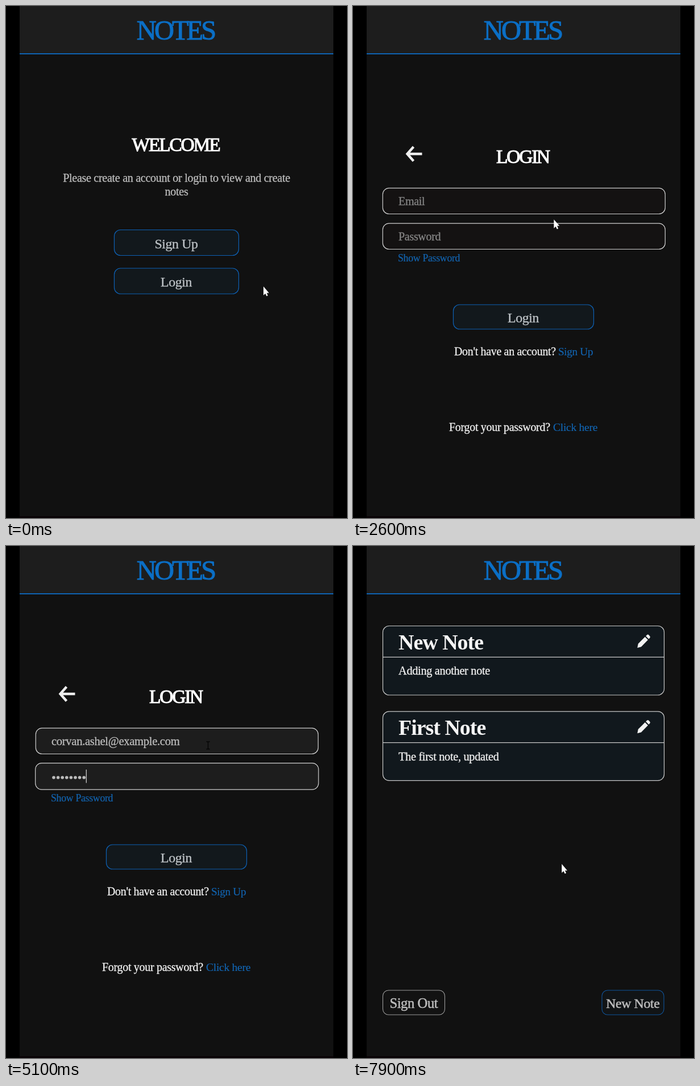
Write an HTML page that moves like this. It is 600 px wide and 900 px high and loops after 8000 ms.

```html
<!DOCTYPE html>
<html lang="en">
<head>
<meta charset="utf-8">
<title>Notes</title>
<style>
html, body { margin: 0; width: 100%; height: 100%; overflow: hidden; background: #000; }
svg { display: block; width: 600px; height: 900px; }
text { font-family: "Liberation Serif", "Times New Roman", serif; font-size: 20.2px; letter-spacing: -.017em; fill: #bdbdbd; stroke-width: .3px; stroke: currentColor; color: #bdbdbd; white-space: pre; }
.mid { text-anchor: middle; }
.brand { font-size: 48.5px; letter-spacing: -4px; fill: #0b6fc6; color: #0b6fc6; stroke-width: 1px; }
.head { font-size: 33.5px; letter-spacing: -2.2px; fill: #fff; color: #fff; stroke-width: 1.1px; }
.bright { fill: #f2f2f2; color: #f2f2f2; }
.link { fill: #1264b0; color: #1264b0; stroke-width: .2px; }
.title { font-size: 38px; letter-spacing: -.027em; font-weight: bold; fill: #f4f4f4; stroke: none; }
.hint { font-size: 20.1px; fill: #858585; color: #858585; }
.btn rect { fill: #12181c; stroke: #0d60b4; stroke-width: 1.2px; }
.btn text { font-size: 23.9px; fill: #bfc4c8; color: #bfc4c8; }
.btn.hover rect { fill: #0c1a28; }
.btn.hover text { fill: #fff; color: #fff; }
.foot text { font-size: 23.9px; stroke-width: .5px; }
.foot rect { stroke-width: 1.1px; }
.field { fill: #141212; stroke: #cfcfcf; stroke-width: 1.2px; }
.field.lit { fill: #1d1d1d; }
.card rect, .card path { fill: #11181d; stroke: #c8c8c8; stroke-width: 1.2px; }
.dot { fill: #136ec1; }
.caret { stroke: #d8d8d8; stroke-width: 1.2px; }
</style>
</head>
<body>
<svg viewBox="0 0 600 900">
  <defs>
    <g id="pencil">
      <path d="M500.3 179L501.8 171.8L513.8 159.8L519 165L507 177.3Z"/>
      <path d="M515.2 158.3L517.4 156.2Q518.8 155 520.2 156.3L522.3 158.4Q523.6 159.9 522.3 161.4L520.3 163.5Z"/>
    </g>
  </defs>
  <rect width="600" height="900"/>
  <rect x="24" width="552" height="897" fill="#111"/>
  <rect x="24" y="897" width="552" height="3" fill="#080205"/>
  <rect x="24" width="552" height="83" fill="#1d1d1d"/>
  <rect x="24" y="83" width="552" height="2" fill="#0e62b2"/>
  <text class="brand mid" x="298" y="58.8">NOTES</text>

  <g id="welcome">
    <text class="head mid" x="298.5" y="255">WELCOME</text>
    <text class="mid" x="300" y="309">Please create an account or login to view and create</text>
    <text class="mid" x="300" y="333">notes</text>
    <g class="btn">
      <rect x="190.5" y="393.5" width="219" height="45" rx="11"/>
      <text class="mid" x="299.5" y="425.5">Sign Up</text>
    </g>
    <g class="btn" id="enter">
      <rect x="190.5" y="461" width="219" height="45" rx="11"/>
      <text class="mid" x="299.5" y="493">Login</text>
    </g>
  </g>

  <g id="login">
    <path d="M106.5 247.5L95.5 260L106.5 272.5M97 260H121.5" fill="none" stroke="#eee" stroke-width="4.4"/>
    <text class="head mid" x="298.5" y="275.5">LOGIN</text>
    <rect class="field" id="mailBox" rx="11"/>
    <rect class="field" id="passBox" rx="11"/>
    <text class="hint" id="mailHint" x="80" y="349.5">Email</text>
    <text id="mail" x="80" y="349.5" style="font-size:20.7px"></text>
    <text class="hint" id="passHint" x="80" y="411.5">Password</text>
    <g id="bullets" fill="#bcbcbc"></g>
    <path class="caret" id="caret"/>
    <text class="link" x="79" y="449" style="font-size:17.8px">Show Password</text>
    <g class="btn" id="submit">
      <rect x="176.5" y="525" width="247" height="43" rx="11"/>
      <text class="mid" x="299.5" y="555.5">Login</text>
    </g>
    <text class="bright" x="178" y="614" style="font-size:20px">Don't have an account?</text>
    <text class="link" x="361" y="614" style="font-size:19.2px">Sign Up</text>
    <text class="bright" x="169" y="747" style="font-size:20.1px">Forgot your password?</text>
    <text class="link" x="352" y="747" style="font-size:19.7px">Click here</text>
  </g>

  <g id="loading">
    <text class="bright mid" x="300" y="285.5" style="font-size:19.6px">Data is loading...</text>
    <circle class="dot" cx="274" cy="331"/>
    <circle class="dot" cx="300" cy="331"/>
    <circle class="dot" cx="326" cy="331"/>
  </g>

  <g id="notes">
    <g class="card">
      <rect x="52.5" y="140.5" width="495" height="121.5" rx="11"/>
      <path d="M52.5 195.3H547.5"/>
      <text class="title" x="80" y="182">New Note</text>
      <text class="bright" x="80" y="226.3" style="font-size:20.4px">Adding another note</text>
    </g>
    <g class="card" transform="translate(0 150.3)">
      <rect x="52.5" y="140.5" width="495" height="121.5" rx="11"/>
      <path d="M52.5 195.3H547.5"/>
      <text class="title" x="80" y="182">First Note</text>
      <text class="bright" x="80" y="226.3" style="font-size:20.4px">The first note, updated</text>
    </g>
    <use href="#pencil" fill="#f2f2f2"/>
    <use href="#pencil" y="150.3" fill="#f2f2f2"/>
    <g class="foot">
      <rect x="52.5" y="781" width="109" height="43" rx="10" fill="#121212" stroke="#9c9c9c"/>
      <text class="mid" x="106.8" y="811.5" style="font-size:24.6px">Sign Out</text>
      <rect x="438" y="781" width="109" height="43" rx="10" fill="#111416" stroke="#0f549c"/>
      <text class="mid" x="492.3" y="811.5">New Note</text>
    </g>
  </g>

  <g id="cursor">
    <path id="arrow" fill="#fff" d="M0 -1V14.5L3.3 11.4L5.4 16L7.8 15L5.7 10.4H9.8Z"/>
    <path id="hand" fill="#fff" d="M-2 1.5Q-2 0 -.4 0T1.3 1.5V6.2Q3.6 5.6 4 7Q6.2 6.4 6.7 8Q9 7.6 9 9.8V13.5Q9 16 7.6 17.5V19.5H-.2V17.8Q-2.2 15.6 -3.8 12.8Q-5 10.6 -3.6 10.1Q-2.8 10 -2 11.2Z"/>
    <path id="beam" fill="none" stroke="#050505" stroke-width="1.4" d="M-3 -6.5H-1L0 -5.5L1 -6.5H3M0 -5.5V5.5M-3 6.5H-1L0 5.5L1 6.5H3"/>
  </g>
</svg>
<script>
const LOOP = 8000;
const MAIL = "corvan.ashel@example.com";
const OPEN_LOGIN = 2300, OPEN_LOADING = 6233, OPEN_NOTES = 7000;
const MAIL_FOCUS = 2850, PASS_FOCUS = 3600, PASS_TYPE = 4000, KEY_GAP = 100, PASS_LEN = 8;
const mailKeys = [[3000, 1], [3150, 2], [3300, MAIL.length]];

// time, x, y of the pointer's hot spot
const path = [
  [0, 453, 494], [900, 336, 662], [1000, 336, 662], [1400, 484, 585],
  [1800, 390, 492], [2050, 345, 482.5], [2350, 345, 482.5],
  [2700, 355.5, 350.5], [5300, 355.5, 350.5], [5900, 367.3, 560], [LOOP, 367.3, 560]
];

const $ = id => document.getElementById(id);
const show = (id, on) => $(id).style.display = on ? "" : "none";
const set = (el, attrs) => { for (const k in attrs) el.setAttribute(k, attrs[k]); };
const dots = [...document.querySelectorAll(".dot")];

for (let i = 0; i < PASS_LEN; i++) {
  const c = document.createElementNS("http://www.w3.org/2000/svg", "circle");
  set(c, { cx: 84 + 7.6 * i, cy: 407, r: 2.8 });
  $("bullets").append(c);
}

function pointer(t) {
  const i = Math.max(1, path.findIndex(p => p[0] > t));
  const [t0, x0, y0] = path[i - 1], [t1, x1, y1] = path[i];
  const u = (t - t0) / (t1 - t0), e = u * u * (3 - 2 * u);
  return [x0 + (x1 - x0) * e, y0 + (y1 - y0) * e];
}

const inside = (x, y, l, top, r, b) => x >= l && x <= r && y >= top && y <= b;

function drawField(el, y, focused, lit) {
  const g = focused ? .6 : 0;
  set(el, { x: 52.3 - g, y: y - g, width: 497 + 2 * g, height: 45.3 + 2 * g });
  el.classList.toggle("lit", lit);
}

function drawForm(t) {
  const typed = mailKeys.filter(k => t >= k[0]).pop();
  const chars = typed ? typed[1] : 0;
  const bullets = Math.max(0, Math.min(PASS_LEN, Math.floor((t - PASS_TYPE) / KEY_GAP) + 1));
  const inPass = t >= PASS_FOCUS, inMail = t >= MAIL_FOCUS && !inPass;

  drawField($("mailBox"), 320.2, inMail, inMail || chars > 0);
  drawField($("passBox"), 382.2, inPass, inPass);
  $("mail").textContent = MAIL.slice(0, chars);
  show("mailHint", !chars);
  show("passHint", !bullets);
  [...$("bullets").children].forEach((c, i) => c.style.display = i < bullets ? "" : "none");

  const lastKey = inPass
    ? (bullets ? PASS_TYPE + (bullets - 1) * KEY_GAP : PASS_FOCUS)
    : (typed ? typed[0] : MAIL_FOCUS);
  show("caret", (inMail || inPass) && (t - lastKey) % 1000 < 500);
  const x = inPass ? 80.5 + 7.6 * bullets : 80.5 + (chars ? $("mail").getComputedTextLength() : 0);
  set($("caret"), { d: inPass ? `M${x} 393V416.5` : `M${x} 331V354.5` });
}

// Outer dots start half a period after the middle one
function drawDots(t) {
  dots.forEach((dot, i) => {
    const age = Math.max(0, t - OPEN_LOADING - (i === 1 ? 0 : 350));
    const dip = 1 - Math.abs(1 - 2 * (age % 700) / 700);
    set(dot, { r: 11.2 * (1 - .25 * dip), opacity: 1 - .8 * dip });
  });
}

function render(t) {
  const scene = t < OPEN_LOGIN ? "welcome" : t < OPEN_LOADING ? "login" : t < OPEN_NOTES ? "loading" : "notes";
  for (const id of ["welcome", "login", "loading", "notes"]) show(id, id === scene);
  const [x, y] = pointer(t);
  const onEnter = scene === "welcome" && inside(x, y, 190, 461, 410, 506);
  const onSubmit = scene === "login" && inside(x, y, 176, 525, 424, 568);
  const onField = scene === "login" &&
    (inside(x, y, 52, 320, 549, 366) || inside(x, y, 52, 382, 549, 428));

  $("enter").classList.toggle("hover", onEnter);
  $("submit").classList.toggle("hover", onSubmit);
  if (scene === "login") drawForm(t);
  if (scene === "loading") drawDots(t);

  show("hand", onEnter || onSubmit);
  show("beam", onField);
  show("arrow", !onEnter && !onSubmit && !onField);
  set($("cursor"), { transform: `translate(${x} ${y})` });
}

const start = performance.now();
function tick() {
  render((performance.now() - start) % LOOP);
  requestAnimationFrame(tick);
}
tick();
</script>
</body>
</html>
```
